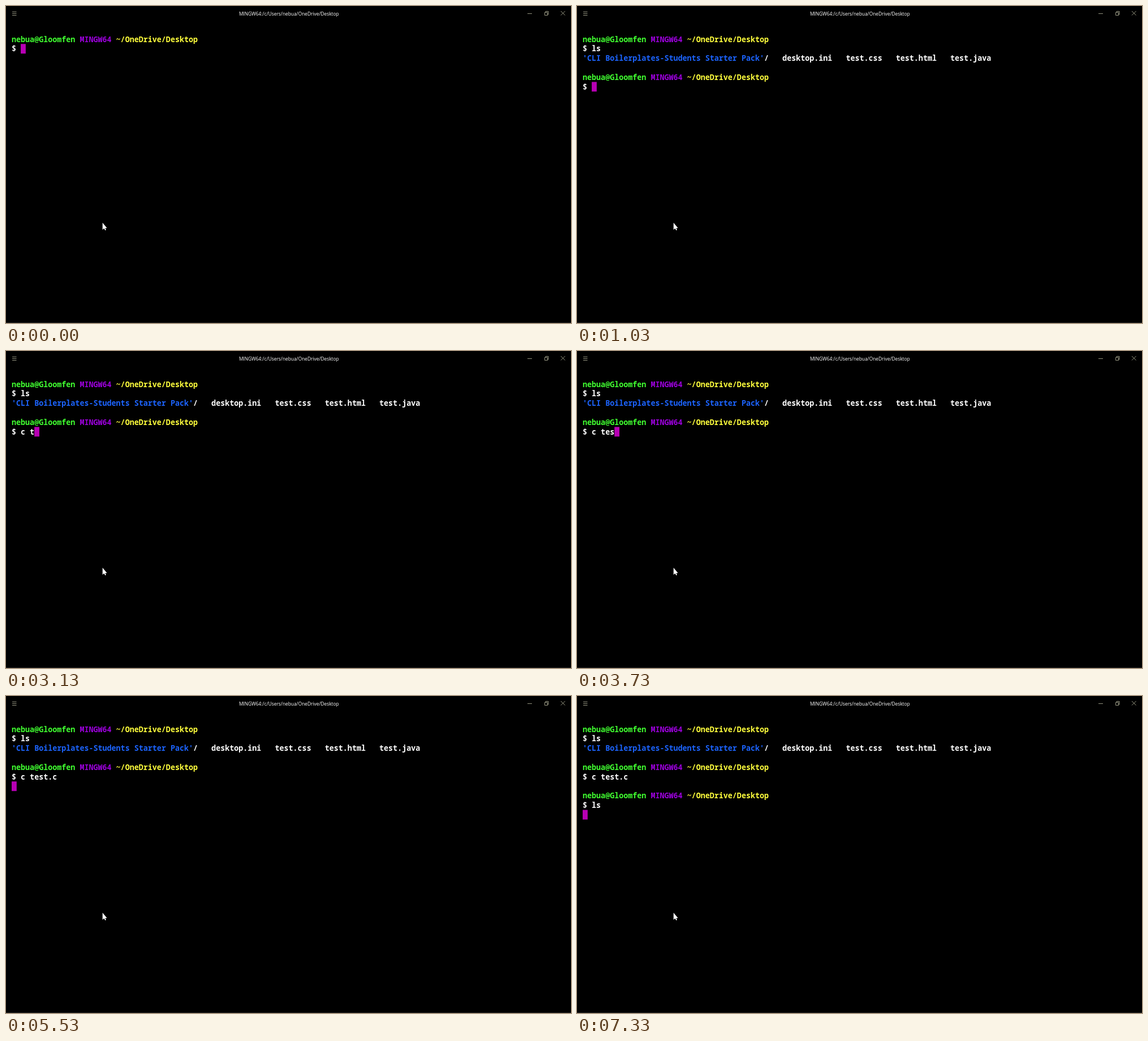
These frames come from a looping animation (999 px wide and 561 px high, 8 s). An HTML page:

```html
<!DOCTYPE html>
<html lang="en">
<head>
<meta charset="utf-8">
<title>Terminal</title>
<style>
  html, body { margin: 0; width: 100%; height: 100%; overflow: hidden; background: #000; }
  svg { display: block; width: 999px; height: 561px; }
  text { white-space: pre; fill: #fff; }
  #lines text { font: 600 13.383px "Noto Sans Mono", "DejaVu Sans Mono", monospace; }
  #title { font: 500 8.36px "Open Sans", "Noto Sans", sans-serif; text-anchor: middle; }
  .icon { fill: none; stroke: #92927e; stroke-width: 1; }
</style>
</head>
<body>
<svg viewBox="0 0 999 561">
  <rect width="999" height="561"/>
  <path class="icon" d="M11 10.5h7.5M11 13.5h7.5M11 16.5h7.5"/>
  <text id="title" x="500.3" y="17">MINGW64:/c/Users/nebua/OneDrive/Desktop</text>
  <path class="icon" d="M922 13.5h8"/>
  <path class="icon" d="M952.5 11.5h5v5h-5zM954 11v-1.5h5v5.500h-1.500"/>
  <path class="icon" stroke="#aaa" d="M981 9l7.500 7.500M988.500 9l-7.500 7.500"/>
  <g id="lines"></g>
  <rect id="cursor" width="8.8" height="17" fill="#b800b4"/>
  <path fill="#fff" d="M170.700 383.500v12.600l2.800-2.500 1.700 3.500 1.800-.8-1.600-3.400h3.200z"/>
  <path stroke="#222" d="M0 560.500h999"/>
</svg>
<script>
const LOOP = 8000, LEFT = 10, TOP = 50.4, CHAR = 8.03, ROW = 16.8, BASELINE = 13.2;
const GREEN = '#40ff30', PURPLE = '#9c00dc', YELLOW = '#ffff3c', BLUE = '#1c64ff', WHITE = '#fff';

const PROMPT = [[GREEN, 'nebua@Gloomfen '], [PURPLE, 'MINGW64 '], [YELLOW, '~/OneDrive/Desktop']];
const LISTING = [
  [BLUE, "'CLI Boilerplates-Students Starter Pack'"],
  [WHITE, '/   desktop.ini   test.css   test.html   test.java']
];

// Each row: spans, time shown, and the times its typed characters appear.
const rows = [
  { row: 0, at: 0, spans: PROMPT },
  { row: 1, at: 0, typed: 'ls', keys: [30, 230] },
  { row: 2, at: 500, spans: LISTING },
  { row: 4, at: 730, spans: PROMPT },
  { row: 5, at: 730, typed: 'c test.c', keys: [1570, 1830, 3130, 3370, 3730, 3900, 4930, 5370] },
  { row: 7, at: 6300, spans: PROMPT },
  { row: 8, at: 6330, typed: 'ls', keys: [7070, 7270] }
];

// After Enter the cursor waits at the start of a fresh row.
const waits = [
  { from: 290, to: 500, row: 2 },
  { from: 500, to: 730, row: 3 },
  { from: 5500, to: 6330, row: 6 },
  { from: 7330, to: LOOP, row: 9 }
];

const make = (name, parent, attrs = {}) => {
  const node = document.createElementNS('http://www.w3.org/2000/svg', name);
  for (const key in attrs) node.setAttribute(key, attrs[key]);
  return parent.appendChild(node);
};

const cursor = document.getElementById('cursor');
const lines = document.getElementById('lines');

for (const line of rows) {
  line.node = make('text', lines, { x: LEFT, y: TOP + line.row * ROW + BASELINE });
  for (const [color, text] of line.spans || []) {
    make('tspan', line.node, { style: `fill:${color}` }).textContent = text;
  }
}

function render(t) {
  let place = { row: 0, col: 0 };
  for (const line of rows) {
    const shown = t >= line.at;
    line.node.setAttribute('visibility', shown ? 'visible' : 'hidden');
    if (!shown || !line.keys) continue;
    const count = line.keys.filter(key => t >= key).length;
    line.node.textContent = '$ ' + line.typed.slice(0, count);
    place = { row: line.row, col: 2 + count };
  }
  const wait = waits.find(w => t >= w.from && t < w.to);
  if (wait) place = { row: wait.row, col: 0 };
  cursor.setAttribute('x', LEFT + place.col * CHAR);
  cursor.setAttribute('y', TOP + place.row * ROW);
}

const start = performance.now();
function frame() {
  render((performance.now() - start) % LOOP);
  requestAnimationFrame(frame);
}
frame();
</script>
</body>
</html>
```
